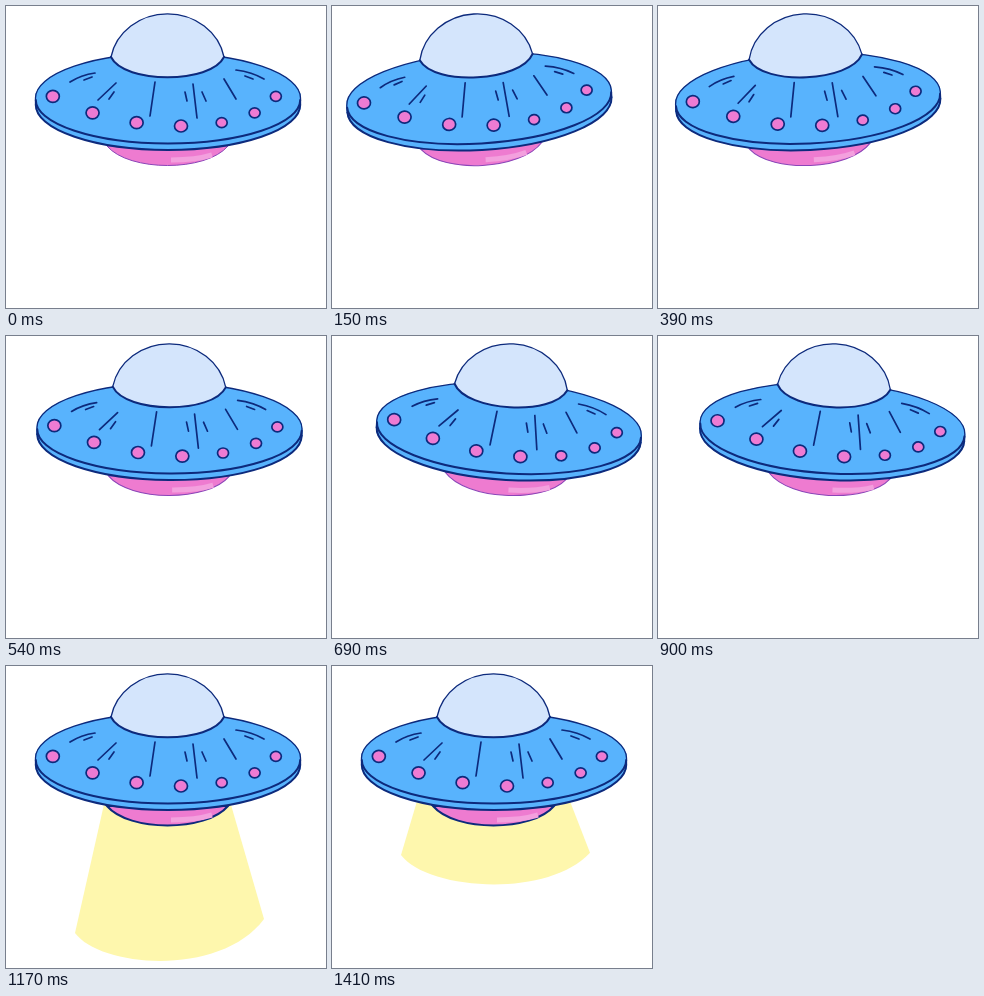
An HTML page that plays this animation: 320x302 px, repeating every 1440 ms.

```html
<!DOCTYPE html>
<html lang="en">
<head>
<meta charset="utf-8">
<title>Flying saucer</title>
<style>
  html, body { margin: 0; width: 100%; height: 100%; overflow: hidden; background: #fff; }
  svg { display: block; width: 100%; height: 100%; }
  .ink, .edge { fill: none; stroke: #0d2a7c; stroke-width: 2; stroke-linecap: round; }
  .edge { stroke-width: 1.3; }
  .marks { stroke-width: 1.7; }
  #lights ellipse { fill: #ee7bd3; stroke: #0d2a7c; stroke-width: 1.7; }
</style>
</head>
<body>
<svg viewBox="0 0 320 302">
  <path id="beam" fill="#fef7ad"/>
  <g id="ship">
    <path id="belly" d="M101 140C123 166 200 166 222 140Z" fill="#ee7bd0"/>
    <path d="M165 154Q190 154 206 149" fill="none" stroke="#f3a0de" stroke-width="5"/>
    <path d="M29 92A133 45 0 0 1 295 92V99A133 45 0 0 1 29 99Z" fill="#58b3fd"/>
    <path class="edge" d="M29.5 99V92A132.5 45 0 0 1 294.5 92V99"/>
    <path class="ink" d="M29.8 99A132.2 45 0 0 0 294.2 99"/>
    <path class="ink" d="M29.8 94A132.2 43.5 0 0 0 294.2 94"/>
    <path class="ink marks" d="M64 76Q75 69 89 67M78 74L86 71
      M92 94L110 77M103 93L108 86M149 76L144 110
      M179 86L181 95M187 78L191 112M196 86L200 95
      M218 73L230 93M230 64Q246 66 258 73M239 70L247 73"/>
    <g id="lights"></g>
    <path d="M105 51A57.5 53 0 0 1 218 51C205 78 118 78 105 51Z" fill="#d4e5fc"/>
    <path class="edge" d="M105 51A57.5 53 0 0 1 218 51"/>
    <path class="ink" d="M105 51C118 78 205 78 218 51"/>
  </g>
</svg>
<script>
  const LOOP = 1440, STEP = 30;
  const get = id => document.getElementById(id);
  const ship = get('ship'), beam = get('beam'), belly = get('belly');

  // Seven lights follow the curve of the rim, smaller on the right.
  for (let i = -3; i <= 3; i++) {
    const light = document.createElementNS(ship.namespaceURI, 'ellipse');
    const r = i > 0 ? 5.5 : 6.5;
    light.setAttribute('cx', 175 + 43.2 * i - 1.85 * i ** 2 - .67 * i ** 3);
    light.setAttribute('cy', 120 - 3.3 * i ** 2);
    light.setAttribute('rx', r);
    light.setAttribute('ry', r - .5);
    get('lights').append(light);
  }

  // Steady glides: centre, far left, far right, centre.
  const LEFT = { step: 8.3, x: -25 }, RIGHT = { step: 25.5, x: 22 }, REST = 36;

  function offsetAt(step) {
    if (step < LEFT.step) return LEFT.x * step / LEFT.step;
    if (step < RIGHT.step) {
      const k = (step - LEFT.step) / (RIGHT.step - LEFT.step);
      return LEFT.x + (RIGHT.x - LEFT.x) * k;
    }
    return RIGHT.x * Math.max(0, REST - step) / (REST - RIGHT.step);
  }

  // How far the beam is pulled in: it slides out, holds, and slides back.
  const pullAt = step => 39 * Math.max(0, 39 - step, step - 45);

  const beamPath = pull => `M${101 - pull / 6} 125L69 ${267 - pull}
    C95 ${302 - pull} 215 ${311 - pull} 258 ${253 - pull * .85}L${221 + pull / 6} 125Z`;

  function draw(time) {
    const step = Math.floor(time % LOOP / STEP);
    const x = offsetAt(step);
    ship.setAttribute('transform', `translate(${x} 0) rotate(${x * .22} 162 90)`);

    const lit = step > REST;
    beam.setAttribute('d', lit ? beamPath(pullAt(step)) : '');
    belly.setAttribute('stroke', lit ? '#0d2a7c' : '#8a45b8');
    belly.setAttribute('stroke-width', lit ? 2 : 1);
  }

  const start = performance.now();
  function tick() {
    draw(performance.now() - start);
    requestAnimationFrame(tick);
  }
  tick();
</script>
</body>
</html>
```
